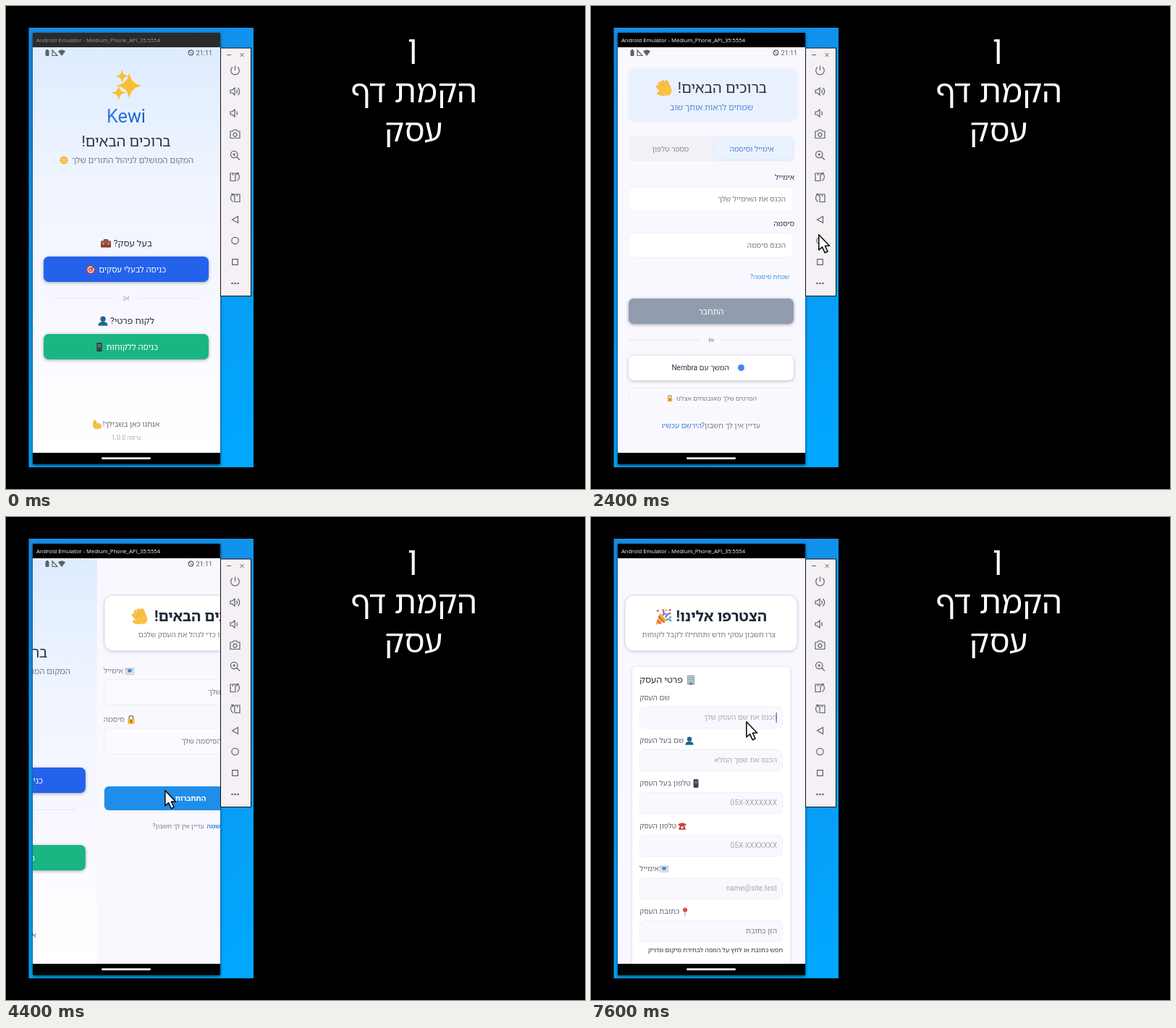
An HTML page with a canvas for the animation above (8 s loop, 800x667 px).

```html
<!DOCTYPE html>
<html lang="he">
<head>
<meta charset="utf-8">
<title>App walkthrough</title>
<style>
html, body { margin: 0; width: 100%; height: 100%; overflow: hidden; background: #000; }
canvas { display: block; width: 100vw; height: 100vh; }
</style>
</head>
<body>
<canvas id="stage" width="800" height="667"></canvas>
<script>
const ctx = document.getElementById('stage').getContext('2d');
const LOOP = 8000, STEP = 200, WIDTH = 259;
const UI = 'Roboto, "Noto Sans Hebrew", "Open Sans", "Liberation Sans", sans-serif';
const WIDE = '"Open Sans", "Noto Sans Hebrew", "Liberation Sans", sans-serif';
const XS = 8.82, S = 10.08, M = 11.34, L = 12.6, XL = 20.2;
const INK = '#2b3440', GREY = '#737a86', PALE = '#a3a8b3', LINK = '#3a8ee0';

// Drawing helpers
function text(str, x, y, size, color, align = 'center', weight = 400, family = UI) {
  ctx.font = `${weight} ${size}px ${family}`;
  ctx.direction = /[א-ת]/.test(str) ? 'rtl' : 'ltr';
  ctx.textAlign = align;
  ctx.fillStyle = color;
  ctx.fillText(str, x, y + size * 0.31);
}
function box(x, y, w, h, r, fill, stroke, shadow) {
  ctx.save();
  ctx.beginPath();
  ctx.roundRect(x, y, w, h, r);
  if (shadow) {
    ctx.shadowColor = shadow;
    ctx.shadowBlur = 4;
    ctx.shadowOffsetY = 1;
  }
  if (fill) { ctx.fillStyle = fill; ctx.fill(); }
  ctx.restore();
  if (stroke) { ctx.strokeStyle = stroke; ctx.lineWidth = 1; ctx.stroke(); }
}
function dot(x, y, r, fill) {
  ctx.beginPath();
  ctx.arc(x, y, r, 0, 7);
  ctx.fillStyle = fill;
  ctx.fill();
}
function path(d, fill, stroke, width = 1) {
  const p = new Path2D(d);
  if (fill) { ctx.fillStyle = fill; ctx.fill(p); }
  if (stroke) { ctx.strokeStyle = stroke; ctx.lineWidth = width; ctx.stroke(p); }
}
function rule(x1, x2, y, color = '#e3e6ee') {
  path(`M${x1} ${y}H${x2}`, null, color);
}
function at(x, y, scale, draw) {
  ctx.save();
  ctx.translate(x, y);
  ctx.scale(scale, scale);
  draw();
  ctx.restore();
}
function linear(x1, y1, x2, y2, ...stops) {
  const g = ctx.createLinearGradient(x1, y1, x2, y2);
  stops.forEach(([p, c]) => g.addColorStop(p, c));
  return g;
}

// Pictograms, each about 12 units wide around the origin
const star4 = (x, y, r) => {
  path(`M${x} ${y - r}Q${x + r * .18} ${y - r * .18} ${x + r} ${y}Q${x + r * .18} ${y + r * .18} ${x} ${y + r}` +
    `Q${x - r * .18} ${y + r * .18} ${x - r} ${y}Q${x - r * .18} ${y - r * .18} ${x} ${y - r}Z`, '#fbbd34', '#fbbd34', .5);
};
const pics = {
  sparkles() { star4(1.4, .3, 4.8); star4(-3.4, 3.6, 2.4); star4(-1.9, -4, 2); },
  sun() {
    for (let i = 0; i < 8; i++) {
      const a = i * Math.PI / 4;
      dot(Math.cos(a) * 4, Math.sin(a) * 4, 1.8, '#f7a928');
    }
    dot(0, 0, 4, '#fdcb45');
  },
  briefcase() {
    path('M-2.5 -3V-5H2.5V-3', null, '#3c2a28', 1.3);
    box(-7, -3.5, 14, 9, 1.3, '#8a3f35');
    box(-7, -3.5, 14, 4, 1.3, '#a85043');
    box(-4.5, -.8, 2, 2.5, .3, '#e2b04a');
    box(2.5, -.8, 2, 2.5, .3, '#e2b04a');
  },
  target() {
    dot(0, 0, 6, '#dc3b35'); dot(0, 0, 4.5, '#f8e4e0');
    dot(0, 0, 3.1, '#dc3b35'); dot(0, 0, 1.6, '#fff');
    path('M0 0L5 -5', null, '#40566b', 1.2);
  },
  bust() {
    dot(0, -2.5, 3.4, '#1f6593');
    path('M-6 6Q-6 1 0 1Q6 1 6 6Z', '#1f6593');
  },
  phone() {
    box(-3.6, -6, 7.2, 12, 1.2, '#27333c');
    box(-2.8, -4.6, 5.6, 8.6, .3, '#414b57');
    for (let i = 0; i < 6; i++) {
      box(-2.2 + i % 3 * 1.6, -4 + (i / 3 | 0) * 2.2, 1.2, 1.3, .2, ['#e35b52', '#5bb974', '#5b9fe4'][i % 3]);
    }
  },
  muscle() {
    path('M-5 -5Q-2 -7 -1 -4L-2 -1Q2 -3 5 0Q7 4 3 5.5Q-3 7 -5.5 3Z', '#f8c23a', '#e0a02c', .6);
  },
  wave() {
    ctx.rotate(-.55);
    ['M-2.8 1L-3.6 -4', 'M-.8 0L-1.2 -5.2', 'M1.2 0L1.3 -5', 'M3.1 1L3.6 -3.7', 'M-3 3L-5.6 .5'].forEach(d => {
      ctx.lineCap = 'round';
      path(d, null, '#e79e2d', 2.2);
      path(d, null, '#fbc23e', 1.7);
    });
    path('M-4 0Q0 -2 4 0Q4.5 5.5 .5 5.8Q-3 5.5 -4 0Z', '#fbc23e');
  },
  mail() {
    box(-6, -4.2, 12, 8.6, .6, '#dfe7ee', '#b9c8d4');
    path('M-6 -4L0 1L6 -4', null, '#a4b8c7', .9);
    box(-2.6, -3, 5.2, 4.6, .5, '#4c83c4');
  },
  lock() {
    path('M-2.8 -1V-3Q-2.8 -5.5 0 -5.5Q2.8 -5.5 2.8 -3V-1', null, '#7d8791', 1.5);
    box(-4.4, -1.2, 8.8, 7, 1, '#f5b52c');
    dot(0, 1.7, 1.1, '#6a5230');
    box(-.5, 2, 1, 2.2, 0, '#6a5230');
  },
  party() {
    path('M-5.8 5.8L-2.6 -2.8L3 2.8Z', '#f3b43a');
    path('M-4.5 2.5L-2 5M-3.5 -.5L.8 4', null, '#d95a4a', 1.1);
    path('M-.5 -1Q1 -3 -.5 -5.5M1.5 .5Q3 -3 5.5 -2.5', null, '#a35bc0', 1.1);
    path('M2.2 2Q4 1 5.8 3', null, '#3f9fe0', 1.1);
    [[-4, -4.5, '#e65a50'], [2, -4.7, '#f3b43a'], [4.8, -5, '#e65a50'], [5, .3, '#48b06a'], [1.2, -2.2, '#3f9fe0']]
      .forEach(([x, y, c]) => dot(x, y, .8, c));
  },
  building() {
    box(-4.5, -6, 9, 12, .4, '#8ba3a5');
    for (let i = 0; i < 12; i++) box(-3.6 + i % 3 * 2.6, -5 + (i / 3 | 0) * 2.5, 1.9, 1.6, 0, '#c9dce0');
    box(-1.2, 3.8, 2.4, 2.2, 0, '#58666a');
  },
  telephone() {
    path('M-5.8 -.8Q-6 -4.8 0 -4.8Q6 -4.8 5.8 -.8H2.8V-2.2H-2.8V-.8Z', '#d6423c');
    path('M-2.6 -2H2.6L5.2 5H-5.2Z', '#c73731');
    dot(0, 1.8, 2, '#f0d5d2');
  },
  pin() {
    path('M0 0V6', null, '#9aa3aa', 1.2);
    dot(0, -2.6, 3.2, '#e0413c');
    dot(-1, -3.6, .9, '#f5938c');
  }
};
const pic = (name, x, y, scale = 1) => at(x, y, scale, pics[name]);

// App pages
function button(x, y, w, h, fill, pressed) {
  box(x, y, w, h, 7, fill, null, 'rgba(0,0,0,.35)');
  if (pressed) box(x, y, w, h, 7, 'rgba(255,255,255,.1)');
}
function welcome(t) {
  ctx.fillStyle = linear(0, 57, 0, 617, [0, '#deecff'], [.35, '#f1f5ff'], [.7, '#f9f8ff'], [.83, '#fdfcff'], [1, '#fff']);
  ctx.fillRect(37, 57, WIDTH, 560);
  pic('sparkles', 166, 109, 3);
  text('Kewi', 166, 153, 25.2, linear(144, 0, 188, 0, [0, '#2f7be6'], [1, '#1a5fc4']));
  text('ברוכים הבאים!', 166, 188, XL, INK);
  text('המקום המושלם לניהול התורים שלך', 259, 213, M, GREY, 'right');
  pic('sun', 80, 213);
  text('בעל עסק?', 202, 328, L, INK, 'right');
  pic('briefcase', 138, 328);
  button(52, 346, 228, 35, '#2462eb', t >= 4000 && t < 4400);
  text('כניסה לבעלי עסקים', 221, 364, M, '#fff', 'right');
  pic('target', 117, 364);
  rule(68, 150, 404);
  rule(182, 266, 404);
  text('או', 166, 404, S, PALE);
  text('לקוח פרטי?', 205, 435, L, INK, 'right');
  pic('bust', 134, 435, 1.1);
  button(52, 453, 228, 35, '#19b683', t >= 1600 && t < 2200);
  text('כניסה ללקוחות', 210, 471, M, '#fff', 'right');
  pic('phone', 129, 471);
  text('אנחנו כאן בשבילך!', 212, 578, S, '#626a77', 'right');
  pic('muscle', 126, 578);
  text('גרסה 1.0.0', 166, 596, XS, PALE);
}
function plain() {
  ctx.fillStyle = '#faf8ff';
  ctx.fillRect(37, 57, WIDTH, 560);
}
function client() {
  plain();
  box(52, 87, 232, 71, 9, '#e9f1ff', null, 'rgba(80,120,200,.14)');
  text('ברוכים הבאים!', 243, 114, XL, INK, 'right');
  pic('wave', 102, 114, 1.9);
  text('שמחים לראות אותך שוב', 224, 140, M, '#4c89d9', 'right');
  box(52, 179, 229, 35, 7, '#f2f1f7');
  box(170, 181, 109, 31, 6, '#eaf1ff', null, 'rgba(80,120,200,.12)');
  text('אימייל וסיסמה', 222, 198, S, '#477fda');
  text('מספר טלפון', 110, 198, S, '#858a94');
  [['אימייל', 'הכנס את האימייל שלך', 237], ['סיסמה', 'הכנס סיסמה', 301]].forEach(([label, hint, y]) => {
    text(label, 281, y, S, INK, 'right');
    box(52.5, y + 12.5, 227, 34, 7, '#fff', '#f3f2f8');
    text(hint, 269, y + 30, S, GREY, 'right');
  });
  text('שכחת סיסמה?', 274, 374, XS, LINK, 'right');
  button(52, 404, 228, 35, '#929caf');
  text('התחבר', 166, 422, M, '#fff');
  rule(52, 150, 461);
  rule(181, 280, 461);
  text('או', 166, 461, XS, GREY);
  box(52, 483, 228, 34, 7, '#fff', null, 'rgba(0,0,0,.25)');
  dot(207.5, 499.5, 4.5, '#4285f4');
  text('המשך עם Nembra', 191, 500, S, INK, 'right');
  box(52.5, 527.5, 228, 28, 7, '#faf9ff', '#f1f0f7');
  text('הפרטים שלך מאובטחים אצלנו', 229, 542, XS, GREY, 'right');
  pic('lock', 109, 542, .75);
  text('עדיין אין לך חשבון?', 234, 580, S, GREY, 'right');
  text('הירשם עכשיו', 153, 580, S, '#3f7fdb', 'right');
}
function banner(title, sub, icon, right, subRight, iconX) {
  box(47, 108, 238, 77, 12, '#fff', '#d3dcea', 'rgba(60,90,140,.28)');
  text(title, right, 138, XL, '#1f2937', 'right', 700);
  pic(icon, iconX, 138, 1.9);
  text(sub, subRight, 163, S, GREY, 'right');
}
function business(t) {
  plain();
  banner('ברוכים הבאים!', 'התחברו כדי לנהל את העסק שלכם', 'wave', 246, 237, 97);
  text('אימייל', 46, 213, S, GREY, 'left');
  pic('mail', 82, 213);
  box(47, 224.5, 238, 35, 7, '#fcfaff', '#efedf5');
  text('הזן את האימייל שלך', 275, 242, S, GREY, 'right');
  text('סיסמה', 46, 280, S, GREY, 'left');
  pic('lock', 84, 280);
  box(47, 291.5, 238, 36, 7, '#fcfaff', '#efedf5');
  text('הזן את הסיסמה שלך', 240, 310, S, GREY, 'right');
  path('M260 309.5Q267 300 274 309.5Q267 319 260 309.5Z', '#7c8799');
  dot(267, 309.5, 3.2, '#fcfaff');
  dot(267, 309.5, 2, '#7c8799');
  text('שכחת סיסמה?', 280, 356, XS, LINK, 'right');
  box(47, 372, 238, 33, 6, '#1e8eea');
  text('התחברות', 166, 389, S, '#fff', 'center', 700);
  text('עדיין אין לך חשבון?', 185, 427, XS, GREY, 'right');
  text('הרשמה', 218, 427, XS, t >= 5400 ? '#7db8ec' : LINK, 'right', 700);
}
const fields = [
  ['שם העסק', 'הכנס את שם העסק שלך'],
  ['שם בעל העסק', 'הכנס את שמך המלא', 'bust', 136],
  ['טלפון בעל העסק', '05X-XXXXXXX', 'phone', 145],
  ['טלפון העסק', '05X-XXXXXXX', 'telephone', 126],
  ['אימייל', 'name@site.test', 'mail', 101],
  ['כתובת העסק', 'הזן כתובת', 'pin', 130]
];
function signup(t) {
  plain();
  banner('הצטרפו אלינו!', 'צרו חשבון עסקי חדש ותתחילו לקבל לקוחות', 'party', 243, 255, 100);
  box(57, 207, 218, 430, 5, '#fff', null, 'rgba(40,50,80,.2)');
  text('פרטי העסק', 67, 225, L, INK, 'left');
  pic('building', 138, 225, 1.1);
  fields.forEach(([label, hint, icon, x], i) => {
    const y = 250 + i * 59;
    text(label, 67, y, S, '#5d6470', 'left');
    if (icon) pic(icon, x, y, .95);
    box(67.5, y + 12.5, 197, 29, 6, '#faf8ff', '#f0eef6');
    text(hint, 257, y + 27, S, i === 5 ? GREY : PALE, 'right');
  });
  text('חפש כתובת או לחץ על המפה לבחירת מיקום מדויק', 265, 598, XS, INK, 'right');
  if (t >= 7600) box(255.5, 270, 1.3, 14, 0, '#3d7c98');
}

// Page changes: start, duration, direction, page
const slides = [
  [0, 1, 1, welcome],
  [1900, 480, 1, client],
  [2750, 480, -1, welcome],
  [4250, 500, 1, business],
  [5850, 700, 1, signup]
];
function screen(t) {
  let i = slides.length - 1;
  while (slides[i][0] > t) i--;
  const [start, span, dir, page] = slides[i];
  const rest = i ? Math.max(0, 1 - (t - start) / span) ** 3 : 0;
  ctx.save();
  ctx.beginPath();
  ctx.rect(37, 57, WIDTH, 560);
  ctx.clip();
  plain();
  if (rest) at(-dir * WIDTH * (1 - rest), 0, 1, () => slides[i - 1][3](t));
  at(dir * WIDTH * rest, 0, 1, () => page(t));
  if (t < 7200) status();
  ctx.restore();
}
function status() {
  const c = '#5c6168';
  box(54.5, 61, 5, 8, 1, c);
  box(56, 60, 2, 2, 0, c);
  path('M64 61L71 68.5H64Z', null, c, 1.2);
  path('M72 62.5Q77 58.5 82 62.5L77 69Z', c);
  ctx.beginPath();
  ctx.arc(255.5, 64.5, 3.3, 0, 7);
  ctx.strokeStyle = c;
  ctx.stroke();
  path('M253 62L258 67', null, c);
  text('21:11', 285, 65, 9, c, 'right');
}

// Emulator window
function toolbar() {
  const c = '#59636f';
  box(296.5, 58, 42, 342.5, 0, '#f4f0f3', '#111');
  rule(305, 311, 67.5, c);
  path('M323.5 65L328.5 70M328.5 65L323.5 70', null, c);
  const icon = (y, d, fill) => at(316.5, y, 1, () => path(d, fill && c, c, 1.2));
  const speaker = 'M-6.5 -2H-4L-.5 -5V5L-4 2H-6.5Z';
  const device = 'M-6.5 -5H.5V5.5H-6.5ZM-3 -5V-2';
  const turn = 'M3 -5.5Q9 0 3 5.5M2.5 -2.5V-5.5H5.5';
  icon(89, 'M0 -6.5V0M-3.5 -4.5A5.8 5.8 0 1 0 3.5 -4.5');
  icon(118, speaker + 'M2 -2.5Q4 0 2 2.5M4 -5Q8.5 0 4 5');
  icon(148, speaker + 'M2 -2.5Q4 0 2 2.5');
  icon(177, 'M-6.5 -4H-3L-2 -6H2L3 -4H6.5V5.5H-6.5ZM-2.6 .7A2.6 2.6 0 1 0 2.6 .7A2.6 2.6 0 1 0 -2.6 .7');
  icon(206, 'M-6 -1A4.7 4.7 0 1 0 3.4 -1A4.7 4.7 0 1 0 -6 -1M2.3 2.5L6.5 6.5M-1.3 -3V1M-3.3 -1H.7');
  icon(236, device + turn);
  ctx.save();
  ctx.translate(633, 0);
  ctx.scale(-1, 1);
  icon(265, device + turn);
  ctx.restore();
  icon(295, 'M4 -4.5V4.5L-4 0Z');
  icon(324, 'M-4.7 0A4.7 4.7 0 1 0 4.7 0A4.7 4.7 0 1 0 -4.7 0');
  icon(353.5, 'M-3.8 -3.8H3.8V3.8H-3.8Z');
  [-4, 0, 4].forEach(x => dot(316.5 + x, 383, 1.3, c));
}
function desktop(active) {
  ctx.fillStyle = '#000';
  ctx.fillRect(0, 0, 800, 667);
  ctx.fillStyle = linear(31, 30, 342, 637, [0, '#168de8'], [.5, '#0a98f2'], [1, '#00a9ff']);
  ctx.fillRect(31.5, 30, 310.5, 607);
  box(37, 37, WIDTH, 595.5, 0, '#000', null, 'rgba(0,0,0,.7)');
  box(37, 37, WIDTH, 20, 0, active ? '#000' : '#2b2a2a');
  text('Android Emulator - Medium_Phone_API_35:5554', 42, 47.5, 7.6, active ? '#fff' : '#999', 'left', 400, WIDE);
  box(132, 623.3, 68, 2.6, 1.3, '#fff');
  toolbar();
  text('ן', 562, 58, 44, '#fff', 'center', 400, WIDE);
  text('הקמת דף', 563.5, 119, 44, '#fff', 'center', 400, WIDE);
  text('עסק', 563, 173, 44, '#fff', 'center', 400, WIDE);
}

// Pointer: time, x, y
const moves = [
  [200, 318, 300], [400, 262, 441], [800, 262, 441], [1400, 234, 471], [2000, 234, 471],
  [2400, 314, 315], [2600, 316, 293], [3000, 316, 293], [3600, 225, 366], [4200, 225, 366],
  [5000, 187, 435], [5400, 194, 430], [6400, 194, 430], [6800, 200, 392], [7200, 214, 282], [LOOP, 214, 282]
];
function pointer(t) {
  if (t < moves[0][0]) return;
  const i = moves.findIndex(m => m[0] > t);
  const [t0, x0, y0] = moves[i - 1], [t1, x1, y1] = moves[i];
  const p = (t - t0) / (t1 - t0), e = p * p * (3 - 2 * p);
  at(x0 + (x1 - x0) * e, y0 + (y1 - y0) * e, 1, () => {
    ctx.lineJoin = 'round';
    path('M.8 .8V22L5.5 17.8L9.3 25.8L13 24L9.4 16.3H15.6Z', '#fff', '#111', 1.6);
  });
}

function frame(now) {
  const t = Math.floor(now % LOOP / STEP) * STEP;
  desktop(t >= 1600);
  screen(t);
  pointer(t);
  requestAnimationFrame(frame);
}
requestAnimationFrame(frame);
</script>
</body>
</html>
```
